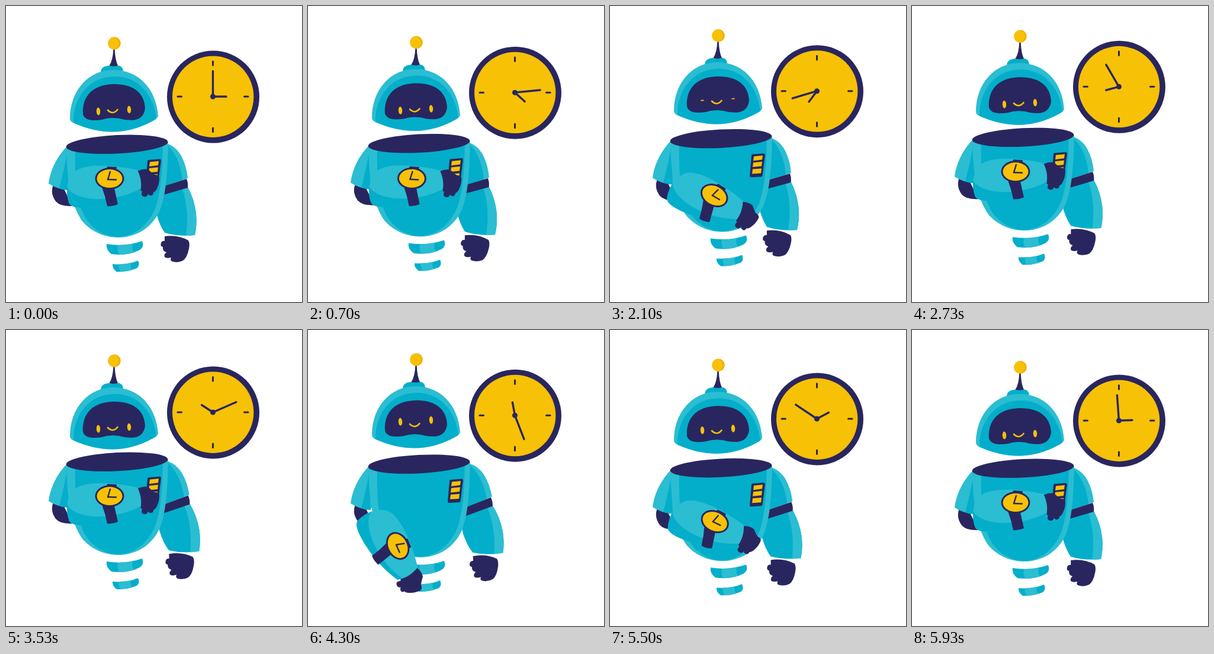
An HTML page with a canvas for the animation above (6010 ms loop, 500 by 500 pixels).

```html
<!DOCTYPE html>
<html lang="en">
<head>
<meta charset="utf-8">
<title>Robot and clock</title>
<style>
  html, body { margin: 0; width: 100%; height: 100%; overflow: hidden; background: #fff; }
  canvas { display: block; width: 500px; height: 500px; }
</style>
</head>
<body>
<canvas id="stage" width="500" height="500"></canvas>
<script>
const ctx = document.getElementById('stage').getContext('2d');
const LOOP = 6010, FRAME = 100 / 3, CYCLE = 179 * FRAME, TAU = Math.PI * 2;
const NAVY = '#29265f', LIGHT = '#2bbdd2', MID = '#03aeca', YELLOW = '#f7c106', AMBER = '#f2b008';

const shapes = {
  ribTop: 'M170 402 Q201 407 230 397 Q234 407 226 412 Q205 423 178 419 Q168 411 170 402Z',
  ribTopShine: 'M189 404 Q202 404 214 402 Q212 410 216 416 Q204 420 191 420 Q187 411 189 404Z',
  ribLow: 'M180 436 Q204 438 223 430 Q227 438 221 443 Q206 449 187 449 Q179 443 180 436Z',
  ribLowShine: 'M191 436 Q202 436 211 434 Q209 440 213 446 Q203 449 194 449 Q189 442 191 436Z',
  torso: 'M102 237 C103 290 108 335 130 365 C150 386 172 391 192 391 C222 390 248 373 260 345 C272 315 273 270 274 230Z',
  torsoFront: 'M117 238 C116 290 118 335 137 362 C152 382 172 390 190 390 C218 389 240 370 252 342 C263 312 264 270 265 232Z',
  badge: 'M241 260 L260 258.5 Q262 259 262 261 L257.5 296 Q257 298 255 298 L238 299 Q236 299 236 297 L239 262 Q239 260 241 260Z',
  badgeBars: 'M243 263.5 L258 262 L257 269 L242 271Z M242 274 L257 272.5 L256 280 L241 281.5Z M241 285 L256 284 L255 292 L240 293Z',
  upperLeft: 'M104 236 C88 252 75 275 72 300 Q86 309 103 311 L118 300 Q114 262 117 240Z',
  upperLeftFold: 'M103 250 Q97 282 90 308 Q98 311 106 311 Q104 280 106 250Z',
  elbow: 'M80 302 Q74 316 84 330 Q92 339 112 338 L98 309Z',
  forearm: 'M107 334 C101 317 101 298 112 284 C122 270 150 269 175 270 Q200 272 222 277 Q232 297 226 317 C200 330 180 336 150 340 C125 342 112 341 107 334Z',
  forearmShade: 'M107 334 Q102 320 103 306 C116 330 180 334 227 309 L226 317 C200 330 180 336 150 340 C125 342 112 341 107 334Z',
  strap: 'M171 271 L187 272 L183 308 L189 335 Q180 339 171 338 Q168 322 162 306 L168 290Z',
  leftHand: 'M222 279 Q231 274 240 276 Q245 281 251 285 Q258 285 259 290 Q259 300 256 306 Q253 314 249 315 Q249 321 243 320 Q240 319 240 317 Q239 323 233 322 Q227 321 230 313 Q225 312 226 307 Q229 293 222 279Z',
  upperRight: 'M250 240 L270 232 Q286 236 296 253 Q305 270 307 291 L250 310Z',
  upperRightShade: 'M250 240 L270 232 Q294 254 298 294 L250 310Z',
  cuff: 'M252 309 L305 292 Q308 299 307 307 L252 323Z',
  lowerRight: 'M250 322 L307 306 Q318 326 321 350 Q323 370 319 387 Q293 390 268 383 Q259 370 254 350Z',
  lowerRightEdge: 'M298 309 L307 306 Q318 326 321 350 Q323 370 319 387 L304 388 Q310 345 298 309Z',
  rightHand: 'M268 389 Q290 386 308 396 Q311 401 309 410 Q306 425 299 430 Q291 434 283 432 Q276 431 279 425 Q271 427 268 424 Q266 420 271 416 Q264 414 265 407 Q260 406 262 400 Q264 396 268 397Z',
  cap: 'M160 111 Q161 102 172 101 Q182 98 192 101 Q198 103 198 112Z',
  stem: 'M181.3 73 L183.7 73 Q184.5 92 189 100.5 Q182 103 174.5 100.5 Q180.5 92 181.3 73Z',
  dome: 'M108 191 C108 142 140 108 181 108 C224 108 254 140 257 186 Q255 191 248 194 Q185 229 115 198 Q109 196 108 191Z',
  domeFront: 'M114 197.5 C113 152 143 119 184 119 C220 119 248 145 254 190 L248 194 Q185 229 114 197.5Z',
  visor: 'M130 183 C128 150 149 133 180 132 C214 131 234 146 235 173 C232 194 215 194 200 192 Q180 186 162 192 C148 194 133 194 130 183Z'
};
for (const k in shapes) shapes[k] = new Path2D(shapes[k]);

function paint(color, ...names) {
  ctx.fillStyle = color;
  for (const n of names) ctx.fill(shapes[n]);
}

function oval(x, y, rx, ry, color, tilt = 0) {
  ctx.beginPath();
  ctx.ellipse(x, y, rx, ry, tilt, 0, TAU);
  ctx.fillStyle = color;
  ctx.fill();
}

function line(x1, y1, x2, y2, width, color = NAVY) {
  ctx.beginPath();
  ctx.moveTo(x1, y1);
  ctx.lineTo(x2, y2);
  ctx.lineWidth = width;
  ctx.strokeStyle = color;
  ctx.stroke();
}

function shifted(dy, draw) {
  ctx.save();
  ctx.translate(0, dy);
  draw();
  ctx.restore();
}

function turned(x, y, angle, draw) {
  ctx.save();
  ctx.translate(x, y);
  ctx.rotate(angle);
  ctx.translate(-x, -y);
  draw();
  ctx.restore();
}

function ease(t, from, to) {
  const u = Math.min(1, Math.max(0, (t - from) / (to - from)));
  return (1 - Math.cos(Math.PI * u)) / 2;
}

const bob = (a, turns = 1) => (1 - Math.cos(a * turns)) / 2;

// 0: looking at the watch, 1: arm lowered and head up
const lowered = t => ease(t, 700, 1200) - ease(t, 1870, 2370)
                   + ease(t, 3700, 4200) - ease(t, 5250, 5750);

function blink(t) {
  const d = Math.abs(t % 3000 - 2100);
  return 0.14 + 0.86 * ease(d, 30, 140);
}

function rightArm(a) {
  const sway = 2.5 - 1.41 * Math.cos(a) - 8.14 * Math.sin(a)
             - 1.09 * Math.cos(2 * a) + 0.62 * Math.sin(2 * a);
  turned(275, 235, -sway / 175, () => {
    paint(MID, 'lowerRight');
    paint(LIGHT, 'lowerRightEdge', 'upperRight');
    paint(MID, 'upperRightShade');
    paint(NAVY, 'cuff', 'rightHand');
  });
}

function leftForearm(s) {
  turned(99, 313, s * 64 * Math.PI / 180, () => {
    paint(NAVY, 'leftHand');
    paint(LIGHT, 'forearm');
    paint(MID, 'forearmShade');
    paint(NAVY, 'strap');
    oval(175, 291.5, 24.5, 18.5, NAVY);
    oval(175, 291.5, 21.5, 15.5, YELLOW);
    line(172, 293, 176, 280, 2.4);
    line(172, 293, 186, 293.5, 2.4);
  });
}

function body(a, armPose) {
  paint(MID, 'ribTop', 'ribLow');
  paint(LIGHT, 'ribTopShine', 'ribLowShine');
  rightArm(a);
  paint(NAVY, 'elbow');
  paint(LIGHT, 'upperLeft');
  paint(MID, 'upperLeftFold');
  paint(LIGHT, 'torso');
  paint(MID, 'torsoFront');
  oval(187.5, 233.7, 86, 15.6, NAVY, -0.05);
  paint(NAVY, 'badge');
  paint(YELLOW, 'badgeBars');
  leftForearm(armPose);
}

function head(t, s) {
  paint(MID, 'cap');
  paint(NAVY, 'stem');
  oval(183, 63, 10.7, 10.7, AMBER);
  oval(181.5, 63, 9, 10.2, YELLOW);
  paint(LIGHT, 'dome');
  paint(MID, 'domeFront');
  paint(NAVY, 'visor');

  const eyeY = 178 - 9.8 * s, open = blink(t);
  oval(156, eyeY, 3.2, 6.5 * open, YELLOW, -0.05);
  oval(208, eyeY - 3, 3.2, 6.3 * open, YELLOW, -0.05);
  const y = 175.5 - 4 * s;
  ctx.beginPath();
  ctx.moveTo(172, y + 0.5);
  ctx.quadraticCurveTo(180.5, y + 9, 188.5, y - 0.5);
  ctx.lineWidth = 2.6;
  ctx.strokeStyle = YELLOW;
  ctx.stroke();
}

function clockHand(angle, length) {
  line(349.5, 153, 349.5 + length * Math.sin(angle), 153 - length * Math.cos(angle), 3.4);
}

function clock(a) {
  oval(350, 153.5, 78, 78, NAVY);
  oval(349.7, 153.2, 68.7, 68.7, YELLOW);
  for (let i = 0; i < 4; i++) {
    turned(349.5, 153, i * TAU / 4, () => line(349.5, 93.5, 349.5, 100, 3));
  }
  clockHand(2 * a, 43);
  clockHand(TAU / 4 + a, 22.5);
  oval(349.5, 153, 4.5, 4.5, NAVY);
}

function render(t) {
  const a = TAU * t / CYCLE;
  const s = lowered(t);
  const lift = -12 * bob(a);
  ctx.fillStyle = '#fff';
  ctx.fillRect(0, 0, 500, 500);
  ctx.lineCap = 'round';
  shifted(lift - 6 * bob(a, 3) - 0.5 * Math.sin(2 * a), () => clock(a));
  // the arm leads the head slightly
  shifted(lift, () => body(a, lowered(t + 40)));
  shifted(lift - 6 * s, () => head(t, s));
}

// Two pictures per 100 ms, the second one held longer
function stepTime(ms) {
  const base = Math.min(5900, Math.floor(ms / 100) * 100);
  return ms - base < 30 ? base : base + FRAME;
}

const start = performance.now();
function tick() {
  render(stepTime((performance.now() - start) % LOOP));
  requestAnimationFrame(tick);
}
tick();
</script>
</body>
</html>
```
